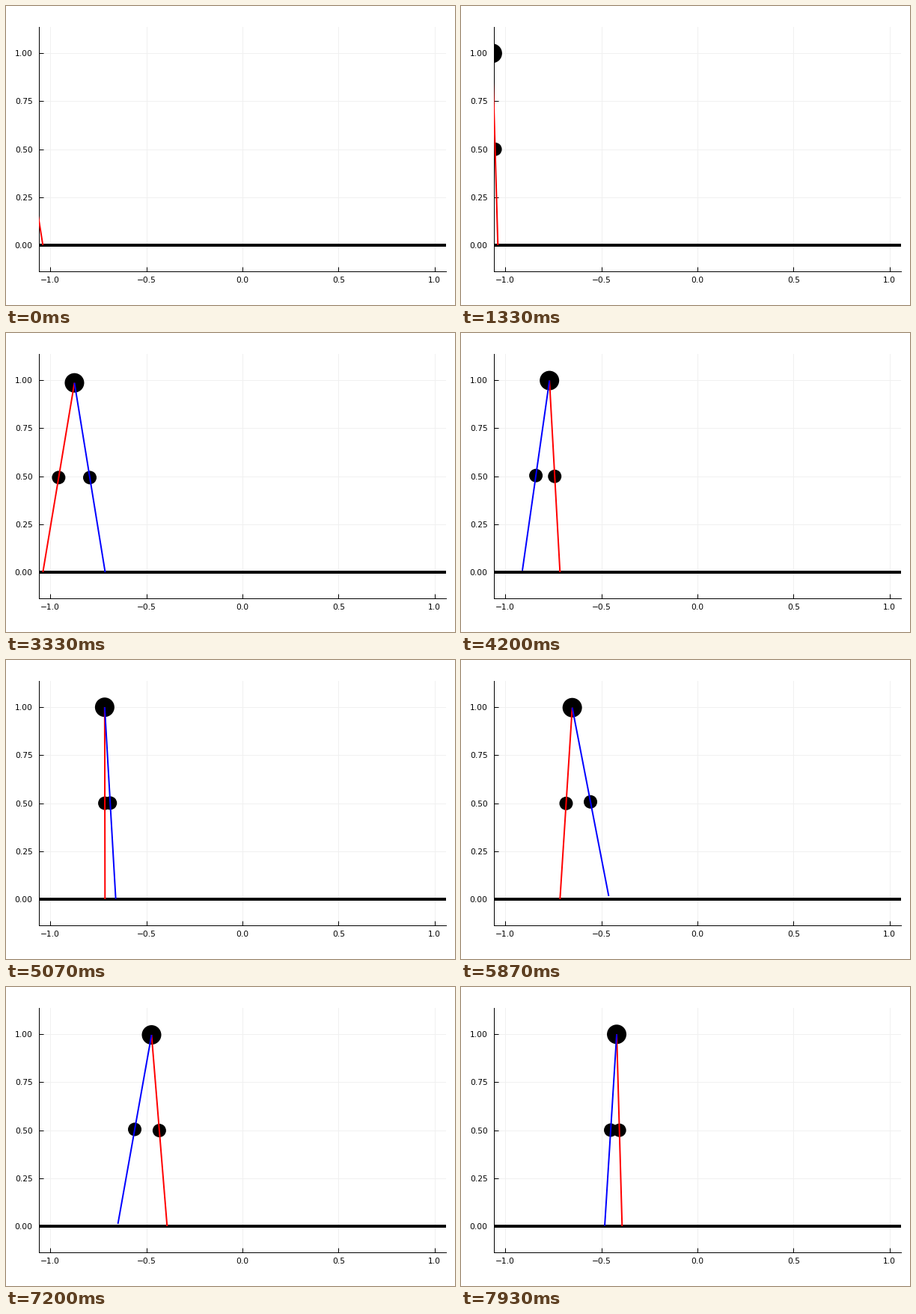
Recreate the animation shown at these times as a matplotlib script. Size 600x400 px, loop 8000 ms.

```python
import numpy as np
import matplotlib.pyplot as plt
from matplotlib.animation import FuncAnimation
from matplotlib.patches import Circle

W, H, DPI = 600, 400, 100
FRAMES, LOOP = 120, 8000
SCALE = 256.8                                  # pixels per unit
LEFT, RIGHT, TOP, BOTTOM = 43.6, 588, 28.4, 355
ORIGIN = (315.9, 320)

STRIKES = np.array([-0.03, 3.28, 6.56])        # seconds at which a step begins
FIRST_FOOT, STRIDE = -1.0382, 0.3232

# Key poses of one step: (seconds into the step, x from the stance foot)
HIP_KEYS = [(0, -.1616), (.053, -.1557), (.64, -.0794), (.9, -.0584),
            (.92, -.0550), (1.053, -.0448), (1.24, -.0319), (1.373, -.0241),
            (1.92, .0070), (2.23, .0276), (2.587, .0642), (3.28, .1616)]
FOOT_KEYS = [(0, -.3232), (.043, -.3222), (.187, -.3142), (.373, -.2978),
             (.64, -.2550), (.92, -.1954), (1.053, -.1615), (1.24, -.1109),
             (1.373, -.0720), (1.92, .0973), (2.23, .1790), (2.587, .2518),
             (2.787, .2841), (3.28, .3232)]


def px(n):
    """Pixels to points."""
    return n * 72 / DPI


def smooth(keys, degree):
    t, x = np.array(keys).T
    weight = np.ones(len(t))
    weight[[0, -1]] = 4
    return np.poly1d(np.polyfit(t, x, degree, w=weight))


hip_path = smooth(HIP_KEYS, 5)
foot_path = smooth(FOOT_KEYS, 6)


def pose(t):
    """Stance foot, hip and swing foot of the walker at time t."""
    step = np.searchsorted(STRIKES, t, side="right") - 1
    tau = t - STRIKES[step]
    base = FIRST_FOOT + STRIDE * step
    dx, fx = hip_path(tau), foot_path(tau)
    hip_y = np.sqrt(1 - dx ** 2)
    foot_y = hip_y - np.sqrt(1 - (fx - dx) ** 2)
    return (np.array([base, 0]), np.array([base + dx, hip_y]),
            np.array([base + fx, foot_y]))


plt.rcParams["font.family"] = "DejaVu Sans"
fig = plt.figure(figsize=(W / DPI, H / DPI), dpi=DPI, facecolor="white")
ax = fig.add_axes([LEFT / W, 1 - BOTTOM / H, (RIGHT - LEFT) / W, (BOTTOM - TOP) / H])
ax.set_xlim((LEFT - ORIGIN[0]) / SCALE, (RIGHT - ORIGIN[0]) / SCALE)
ax.set_ylim((ORIGIN[1] - BOTTOM) / SCALE, (ORIGIN[1] - TOP) / SCALE)
ax.set_xticks(np.linspace(-1, 1, 5))
ax.set_yticks(np.linspace(0, 1, 5))
ax.set_axisbelow(True)
ax.grid(color="#f0f0f0", linewidth=px(1))
ax.tick_params(direction="in", length=px(6), width=px(1), labelsize=px(10.67))
ax.tick_params(axis="x", pad=px(6.5))
ax.tick_params(axis="y", pad=px(8))
for side, spine in ax.spines.items():
    spine.set_linewidth(px(1))
    spine.set_visible(side in ("left", "bottom"))

ax.plot(ax.get_xlim(), [0, 0], color="black", lw=px(4),
        solid_capstyle="butt", zorder=3)


def ball(radius):
    return ax.add_patch(Circle((0, 0), radius / SCALE, color="black", lw=0, zorder=4))


def leg(color):
    return ax.plot([], [], color=color, lw=px(2), solid_capstyle="butt", zorder=5)[0]


hip_ball, stance_ball, swing_ball = ball(13), ball(9), ball(9)
stance_leg, swing_leg = leg("red"), leg("blue")


def draw(i):
    stance, hip, swing = pose(i * LOOP / FRAMES / 1000)
    hip_ball.center = hip
    stance_ball.center = (hip + stance) / 2
    swing_ball.center = (hip + swing) / 2
    stance_leg.set_data(*zip(stance, hip))
    swing_leg.set_data(*zip(swing, hip))
    return hip_ball, stance_ball, swing_ball, stance_leg, swing_leg


anim = FuncAnimation(fig, draw, frames=FRAMES, init_func=lambda: draw(0),
                     interval=LOOP / FRAMES, repeat=True, repeat_delay=0)
plt.show()
```
